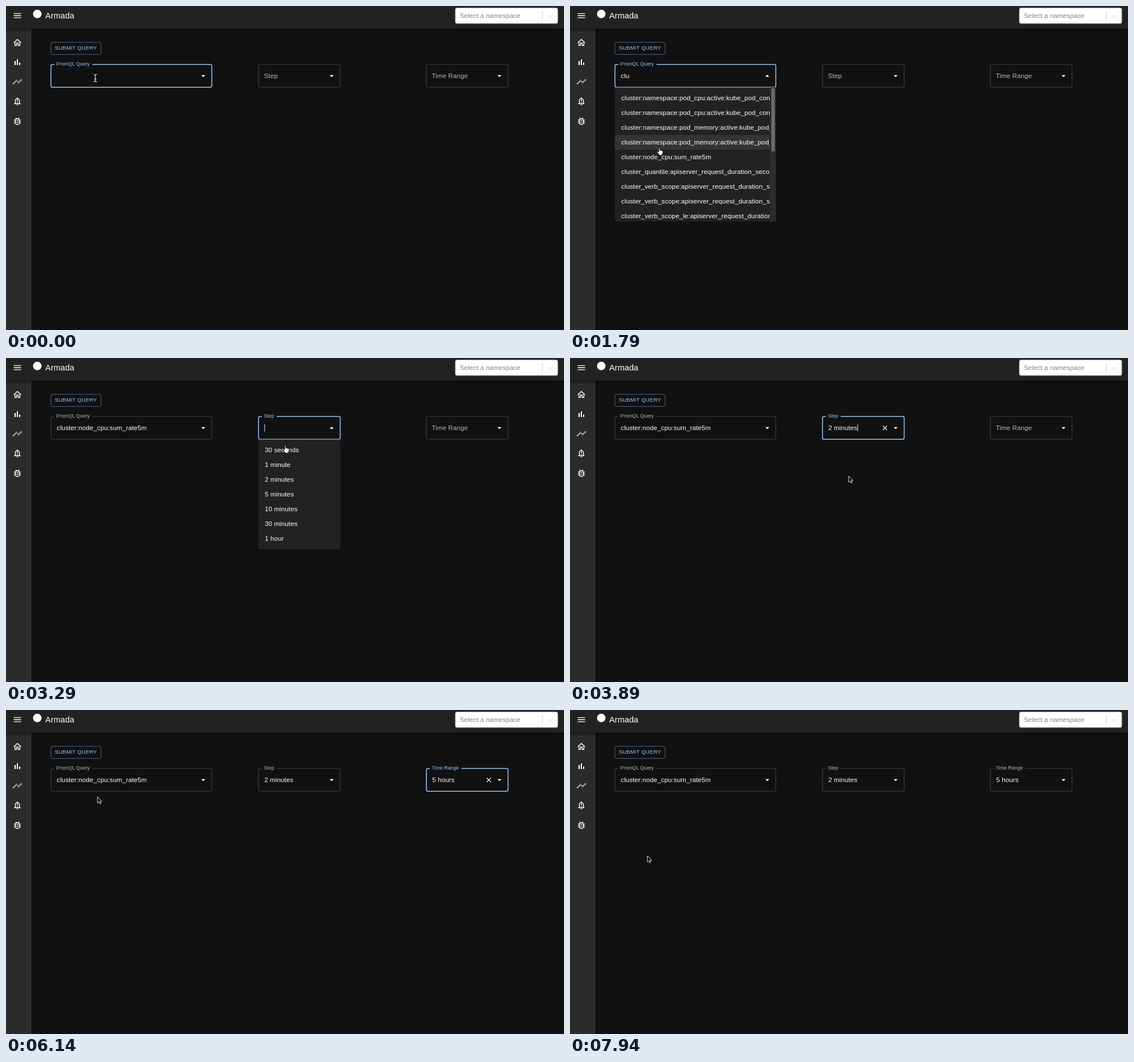
An HTML page for the animation above (8 s loop, 981 by 571 pixels).

```html
<!DOCTYPE html>
<html lang="en">
<head>
<meta charset="utf-8">
<title>Query form</title>
<style>
html, body { margin: 0; width: 100%; height: 100%; overflow: hidden; background: #111; }
svg { display: block; font: 11.55px "Liberation Sans", Arial, sans-serif; letter-spacing: .108px; fill: #fff; }
.label { font-size: 8.67px; letter-spacing: .08px; }
</style>
</head>
<body>
<svg width="981" height="571" viewBox="0 0 981 571">
  <defs>
    <linearGradient id="shade" x2="0" y2="1">
      <stop stop-color="#000" stop-opacity=".45"/><stop offset="1" stop-color="#000" stop-opacity="0"/>
    </linearGradient>
    <clipPath id="buttonClip"><rect x="79" y="64" width="88" height="21.5" rx="2.9"/></clipPath>
    <clipPath id="listClip"><rect x="79" y="143" width="272.3" height="236.5"/></clipPath>
  </defs>
  <rect width="981" height="571" fill="#111"/>
  <rect y="40" width="44" height="531" fill="#2b2b2b"/>
  <rect x="43" y="40" width="1" height="531" fill="#404040"/>
  <rect y="40" width="981" height="6" fill="url(#shade)"/>
  <rect width="981" height="40" fill="#222"/>
  <g id="icons"></g>
  <circle cx="55" cy="14" r="7.5"/>
  <text x="69" y="21.7" font-size="14.44">Armada</text>
  <rect x="790" y="3.4" width="180" height="27.4" rx="2.9" stroke="#ccc" stroke-width=".7"/>
  <text x="797.8" y="21.2" fill="#808080">Select a namespace</text>
  <path d="M943 9.2V25M952.8 15.8l3.8 3.8 3.8-3.8" fill="none" stroke="#ccc"/>
  <g id="scene"></g>
</svg>
<script>
const LOOP = 8000, STEP = 150, FIRST = 140;
const BLUE = '#90caf9', DIM = '#b8b8b8', ROW = 26, LIST_TOP = 149.2, FIELD_TOP = 103, FIELD_BOTTOM = 143.4;

const icons = [
  [17, 'M3 6h18v2H3zM3 11h18v2H3zM3 16h18v2H3z'],
  [64.5, 'M12 5.69l5 4.5V18h-2v-6H9v6H7v-7.81l5-4.5M12 3L2 12h3v8h6v-6h2v6h6v-8h3z'],
  [99, 'M5 9.2h3V19H5zM10.6 5h2.8v14h-2.8zM16.2 13H19v6h-2.8z'],
  [133.5, 'M3.7 16.7L10 10.4l5 5 6.7-6.7-1.4-1.4L15 12.6l-5-5-7.7 7.7z' +
    [[3, 16], [10, 9], [15, 14], [21, 8]].map(([x, y]) => `M${x - 2} ${y}a2 2 0 0 1 4 0a2 2 0 0 1-4 0z`).join('')],
  [168, 'M12 22c1.1 0 2-.9 2-2h-4c0 1.1.9 2 2 2zm6-6v-5c0-3.07-1.63-5.64-4.5-6.32V4c0-.83-.67-1.5-1.5-1.5s-1.5.67-1.5 1.5v.68C7.64 5.36 6 7.92 6 11v5l-2 2v1h16v-1l-2-2zm-2 1H8v-6c0-2.48 1.51-4.5 4-4.5s4 2.02 4 4.5zM11 8h2v4h-2zM11 14h2v2h-2z'],
  [203, 'M20 8h-2.81c-.45-.78-1.07-1.45-1.82-1.96L17 4.41 15.59 3l-2.17 2.17a6 6 0 0 0-2.83 0L8.41 3 7 4.41l1.62 1.63C7.88 6.55 7.26 7.22 6.81 8H4v2h2.09c-.05.33-.09.66-.09 1v1H4v2h2v1c0 .34.04.67.09 1H4v2h2.81a6 6 0 0 0 10.38 0H20v-2h-2.09c.05-.33.09-.66.09-1v-1h2v-2h-2v-1c0-.34-.04-.67-.09-1H20zm-4 7a4 4 0 0 1-8 0v-4a4 4 0 0 1 8 0zm-6-1h4v2h-4zm0-4h4v2h-4z']
];
document.getElementById('icons').innerHTML = icons.map(([y, d]) =>
  `<path transform="translate(20 ${y}) scale(.722) translate(-12 -12)" fill-rule="${y === 133.5 ? 'nonzero' : 'evenodd'}" d="${d}"/>`).join('');

const clusterMetrics = [
  'cluster:namespace:pod_cpu:active:kube_pod_container_resource_limits',
  'cluster:namespace:pod_cpu:active:kube_pod_container_resource_requests',
  'cluster:namespace:pod_memory:active:kube_pod_container_resource_limits',
  'cluster:namespace:pod_memory:active:kube_pod_container_resource_requests',
  'cluster:node_cpu:sum_rate5m',
  'cluster_quantile:apiserver_request_duration_seconds:histogram_quantile',
  'cluster_verb_scope:apiserver_request_duration_seconds_count:increase1h',
  'cluster_verb_scope:apiserver_request_duration_seconds_count:increase30d',
  'cluster_verb_scope_le:apiserver_request_duration_seconds_bucket:increase1h'
];
const clientMetrics = ['bucket', 'count', 'sum'].map(s => 'apiserver_client_certificate_expiration_seconds_' + s);
const aggregatorMetrics = ['discovery_aggregation_count_total', 'openapi_v2_regeneration_count',
  'openapi_v2_regeneration_duration', 'unavailable_apiservice', 'unavailable_apiservice_total'].map(s => 'aggregator_' + s);

const fields = [
  { x: 79, w: 282.8, name: 'PromQL Query', labelWidth: 59.5, value: 'cluster:node_cpu:sum_rate5m',
    focus: [0, 2990], open: [140, 2240] },
  { x: 443.9, w: 143.6, name: 'Step', labelWidth: 18.5, value: '2 minutes', focus: [2990, 4640], open: [2990, 3890],
    options: ['30 seconds', '1 minute', '2 minutes', '5 minutes', '10 minutes', '30 minutes', '1 hour'] },
  { x: 739, w: 143.6, name: 'Time Range', labelWidth: 48, value: '5 hours', focus: [4640, 6890], open: [4790, 5690],
    options: ['30 minutes', '1 hour', '2 hours', '5 hours', '12 hours', '24 hours', '48 hours'] }
];
const caretOn = [[140, 740], [1040, 1340], [2240, 2690], [2990, 3590], [3890, 4340], [4790, 5240], [5690, 6140], [6590, 6890]];

// Pointer waypoints: time, x, y
const pointerPath = [
  [0, 157, 127], [1190, 157, 127], [1340, 157, 155], [1640, 157, 235], [1940, 157, 266], [2240, 157, 266],
  [2390, 190, 250], [2540, 330, 195], [2690, 450, 140], [2840, 492, 124], [3140, 492, 125], [3290, 491, 155],
  [3590, 490, 208], [3890, 490, 208], [4040, 495, 206], [4490, 740, 135], [4640, 772, 120], [4790, 773, 115],
  [4940, 771, 187], [5390, 769, 240], [5690, 769, 240], [5840, 620, 220], [5990, 300, 172], [6140, 161, 153],
  [6440, 140, 146], [6590, 126, 81], [6740, 126, 79], [7490, 126, 79], [7640, 136, 139], [7790, 136, 215], [7940, 136, 257]
];

const within = (t, [from, to]) => t >= from && t < to;
const textAt = (x, y, s, attrs = '') => `<text x="${x}" y="${y}" ${attrs}>${s}</text>`;

function pointerAt(t) {
  const i = pointerPath.findIndex(p => p[0] > t);
  if (i < 0) return pointerPath.at(-1).slice(1);
  if (i === 0) return pointerPath[0].slice(1);
  const [t0, x0, y0] = pointerPath[i - 1], [t1, x1, y1] = pointerPath[i], k = (t - t0) / (t1 - t0);
  return [x0 + (x1 - x0) * k, y0 + (y1 - y0) * k];
}

function queryOptions(t) {
  if (t < 290) return [...aggregatorMetrics, ...clientMetrics, clusterMetrics[0]];
  return t < 740 ? [...clientMetrics, ...clusterMetrics].slice(0, 9) : clusterMetrics;
}

function fieldValue(f, t) {
  if (t >= f.open[1]) return f.value;
  return f.options ? '' : 'clu'.slice(0, t < 140 ? 0 : t < 290 ? 1 : t < 440 ? 2 : 3);
}

const measure = document.createElement('canvas').getContext('2d');
measure.font = '11.55px "Liberation Sans", Arial, sans-serif';
const textWidth = s => measure.measureText(s).width + s.length * .108;

function drawField(f, t, [px, py]) {
  const focused = within(t, f.focus), open = within(t, f.open), value = fieldValue(f, t);
  const hovered = px > f.x && px < f.x + f.w && py > FIELD_TOP && py < FIELD_BOTTOM;
  const floating = focused || value;
  const right = f.x + f.w, arrowX = right - 15;
  const stroke = focused ? BLUE : hovered ? '#fff' : '#4a4a4a';
  const gapStart = f.x + (floating ? 6.2 : 30), gapEnd = floating ? f.x + 13.6 + f.labelWidth : gapStart;
  let out = `<path d="M${gapEnd} 103H${right - 2.9}q2.9 0 2.9 2.9V140.3q0 2.9-2.9 2.9H${f.x + 2.9}q-2.9 0-2.9-2.9V105.9q0-2.9 2.9-2.9H${gapStart}" fill="none" stroke="${stroke}" stroke-width="${focused ? 1.5 : .9}"/>`;
  out += floating
    ? textAt(f.x + 9.6, 105.3, f.name, `class="label" fill="${focused ? BLUE : DIM}"`)
    : textAt(f.x + 9.6, 126.5, f.name, `fill="${DIM}"`);
  out += textAt(f.x + 10.3, 126.5, value);
  if (focused && caretOn.some(r => within(t, r)))
    out += `<rect x="${f.x + 10.5 + (value ? textWidth(value) : 0)}" y="116.5" width=".9" height="13"/>`;
  out += `<path transform="translate(${arrowX} 123.2) scale(${open ? -.722 : .722})" d="M-5-2L0 3 5-2z"/>`;
  if ((focused || hovered) && t >= f.open[1])
    out += `<path d="M${arrowX - 22.6} 119.4l7.6 7.6m0-7.6l-7.6 7.6" stroke="#fff" stroke-width="1.2"/>`;
  return out;
}

function drawList(f, t, hoverY) {
  const options = f.options || queryOptions(t);
  const bottom = f.options ? LIST_TOP + options.length * ROW + 5.8 : 379.7;
  const row = Math.floor((hoverY - LIST_TOP) / ROW);
  let out = `<rect x="${f.x - .3}" y="143.6" width="${f.w + .5}" height="${bottom - 143.6}" fill="#222"/>`;
  if (row >= 0)
    out += `<rect x="${f.x - .3}" y="${LIST_TOP + row * ROW}" width="${f.options ? f.w + .5 : 272.5}" height="${ROW}" fill="#343434"/>`;
  out += `<g ${f.options ? '' : 'clip-path="url(#listClip)"'}>` +
    options.map((s, i) => textAt(f.x + 11.1, 166.1 + i * ROW, s)).join('') + '</g>';
  if (!f.options)
    out += '<rect x="351" y="143.6" width="11" height="236" fill="#2c2c2c"/><rect x="354" y="145" width="6" height="111" rx="1" fill="#6b6b6b"/>';
  return out;
}

function drawButton(t, [px, py]) {
  const hovered = px > 79 && px < 167 && py > 64 && py < 86;
  const age = t - 6890;
  let out = `<rect x="79" y="64" width="88" height="21.4" rx="2.9" fill="${BLUE}" fill-opacity="${hovered ? .08 : 0}" stroke="${BLUE}" stroke-opacity="${hovered ? 1 : .5}" stroke-width=".9"/>`;
  if (age >= 0 && age < 850) {
    const radius = 90 * Math.min(1, (age + 100) / 550), opacity = .3 * Math.min(1, (850 - age) / 550);
    out += `<circle cx="126" cy="79" r="${radius}" fill="${BLUE}" opacity="${opacity}" clip-path="url(#buttonClip)"/>`;
  }
  return out + textAt(85.8, 77.4, 'SUBMIT QUERY', `fill="${BLUE}" style="font-size:9.39px;letter-spacing:.268px"`);
}

function drawPointer([x, y], list) {
  const inField = y > FIELD_TOP && y < FIELD_BOTTOM && fields.some(f => x > f.x && x < f.x + f.w);
  const onButton = x > 79 && x < 167 && y > 64 && y < 86;
  const at = `transform="translate(${x} ${y})"`;
  if (inField) {
    const beam = 'M-3-6.5q3 0 3 2.2V4.5q0 2.2-3 2.2M3-6.5q-3 0-3 2.2V4.5q0 2.2 3 2.2M-2 1.5h4';
    return `<g ${at} fill="none"><path d="${beam}" stroke="#000" stroke-width="2.4"/><path d="${beam}" stroke="#fff" stroke-width="1.1"/></g>`;
  }
  if (onButton || (list && y > FIELD_BOTTOM))
    return `<path ${at} d="M-1 0q1-1 2 .3V4l1.5-.2 1.4.5 1.3.3 1 .8v3.2L5 11v1.6H0L-.6 11-4 7.2q-.2-1.5 1.3-1.2L-1 7z" stroke="#000" stroke-width=".8"/>`;
  return `<path ${at} d="M0 0V11L2.5 8.7 4.1 12.4 5.9 11.6 4.3 8H7.6z" fill="#000" stroke="#fff" stroke-width=".9"/>`;
}

const scene = document.getElementById('scene');
let shown = -1;

function frame(now) {
  const clock = now % LOOP;
  const t = clock < FIRST ? 0 : FIRST + Math.floor((clock - FIRST) / STEP) * STEP;
  if (t !== shown) {
    shown = t;
    const pointer = pointerAt(t), before = pointerAt(Math.max(0, t - STEP));
    const list = fields.find(f => within(t, f.open));
    // The row highlight trails the pointer slightly.
    scene.innerHTML = drawButton(t, pointer) + fields.map(f => drawField(f, t, pointer)).join('') +
      (list ? drawList(list, t, (pointer[1] + before[1]) / 2) : '') + drawPointer(pointer, list);
  }
  requestAnimationFrame(frame);
}
requestAnimationFrame(frame);
</script>
</body>
</html>
```
